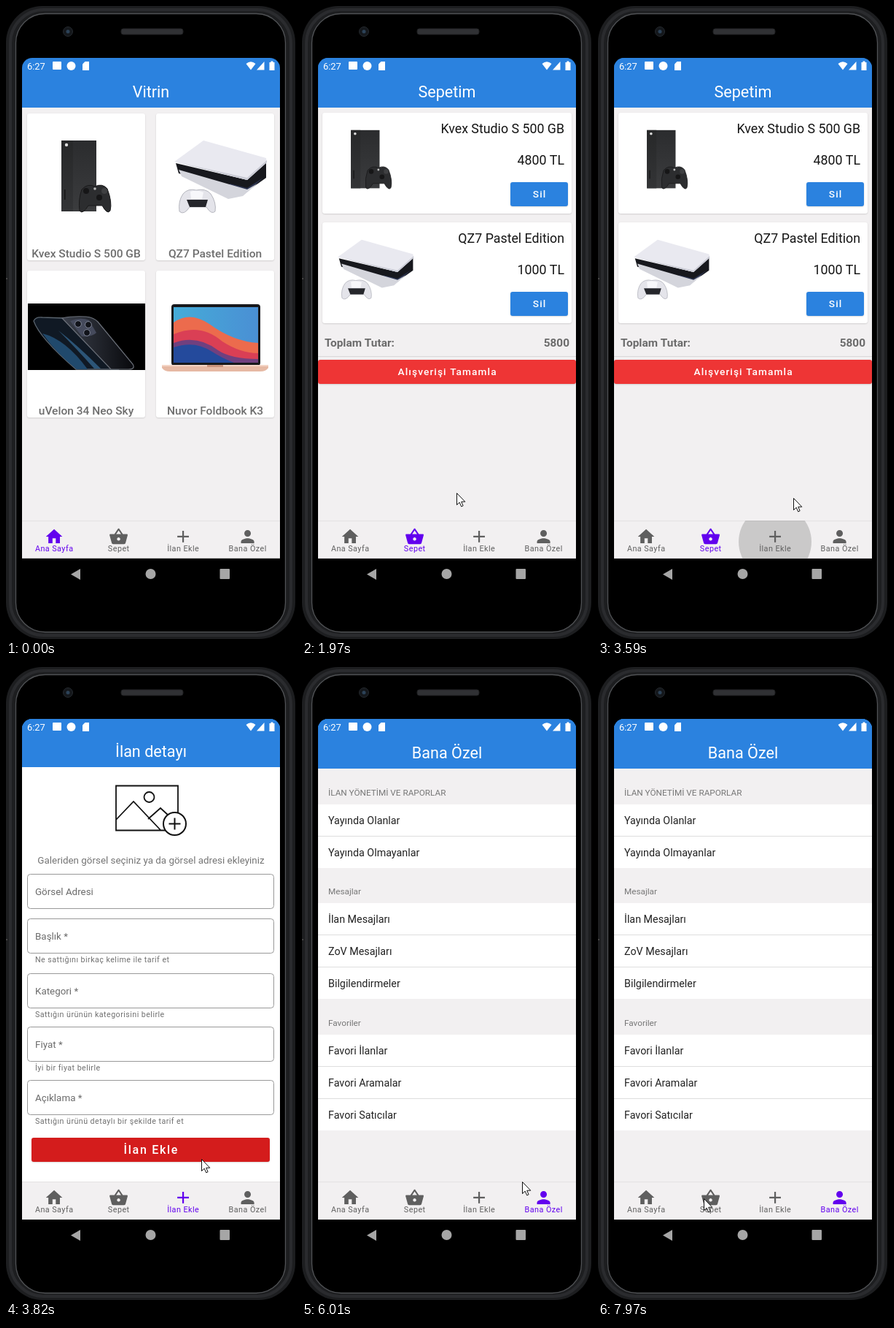
Write an HTML page with a canvas that moves like this. It is 398 px wide and 866 px high and loops after 8000 ms.

```html
<!DOCTYPE html>
<html lang="tr">
<head>
<meta charset="utf-8">
<style>
html, body { margin: 0; width: 100%; height: 100%; overflow: hidden; background: #000; }
canvas { display: block; width: 398px; height: 866px; }
</style>
</head>
<body>
<canvas id="stage" width="398" height="866"></canvas>
<script>
const W = 398, H = 866, LOOP = 8000;
const BLUE = '#2b82df', PAPER = '#f2f0f1', GREY = '#5f5f5f', ACTIVE = '#6200ee';
const stage = document.getElementById('stage').getContext('2d');
let g = stage;

const clamp = v => Math.max(0, Math.min(1, v));
const lerp = (a, b, u) => a + (b - a) * u;

function layer(paint) {
  const c = document.createElement('canvas');
  c.width = W;
  c.height = H;
  g = c.getContext('2d');
  paint();
  g = stage;
  return c;
}
function rect(x, y, w, h, color) {
  g.fillStyle = color;
  g.fillRect(x, y, w, h);
}
function round(x, y, w, h, r, fill, stroke, line = 1) {
  g.beginPath();
  g.roundRect(x, y, w, h, r);
  if (fill) { g.fillStyle = fill; g.fill(); }
  if (stroke) { g.strokeStyle = stroke; g.lineWidth = line; g.stroke(); }
}
function disc(x, y, r, fill, stroke, line = 1) {
  g.beginPath();
  g.arc(x, y, r, 0, 7);
  if (fill) { g.fillStyle = fill; g.fill(); }
  if (stroke) { g.strokeStyle = stroke; g.lineWidth = line; g.stroke(); }
}
function shape(d, fill, stroke, line = 1) {
  const p = new Path2D(d);
  if (fill) { g.fillStyle = fill; g.fill(p); }
  if (stroke) { g.strokeStyle = stroke; g.lineWidth = line; g.stroke(p); }
}
function blend(x0, y0, x1, y1, ...colors) {
  const b = g.createLinearGradient(x0, y0, x1, y1);
  colors.forEach((c, i) => b.addColorStop(i / (colors.length - 1), c));
  return b;
}
function text(s, x, y, size, color, { align = 'left', weight = 400, gap = 0 } = {}) {
  g.font = `${weight} ${size}px Roboto, sans-serif`;
  g.letterSpacing = gap + 'px';
  g.textAlign = align;
  g.fillStyle = color;
  g.fillText(s, x, y);
}
function at(x, y, scale, paint) {
  g.save();
  g.translate(x, y);
  g.scale(scale, scale);
  paint();
  g.restore();
}
function shadowed(paint) {
  g.save();
  g.shadowColor = 'rgba(0,0,0,.17)';
  g.shadowBlur = 2;
  g.shadowOffsetY = .7;
  paint();
  g.restore();
}
const card = (x, y, w, h) => shadowed(() => round(x, y, w, h, 3, '#fff'));
function button(x, y, w, h, color, label, size, gap) {
  shadowed(() => round(x, y, w, h, 3, color));
  text(label, x + w / 2 + gap / 2, y + h / 2 + size * .36, size, '#fff', { align: 'center', weight: 500, gap });
}
function header(title, bottom = 139) {
  rect(22, 71, 354, bottom - 71, BLUE);
  text(title, 199, bottom - 14, 21.6, '#fff', { align: 'center' });
}

// Products, drawn around their own centre
function tower() {
  rect(-34, -49, 48, 97, blend(0, -49, 0, 48, '#2b2c2e', '#3b3c3e'));
  rect(-34, -49, 16, 97, blend(0, -49, 0, 48, '#272829', '#333436'));
  rect(-30, 18, 1.5, 14, '#151515');
  disc(-27, -43, 2.2, '#ddd');
  shape('M-6 18Q2 9 12 14Q22 9 29 17Q36 35 33 47Q29 53 22 40H3Q-5 53 -9 47Q-11 32 -6 18Z', '#2c2d2f', '#19191a');
  disc(0, 20, 4, '#161617');
  disc(18, 29, 4, '#161617');
  disc(25, 20, 4, '#3f4042');
  disc(12, 17, 1.8, '#bbb');
}
function slab() {
  shape('M-54 -18L44 5L70 -19V2L46 19L-50 -4Z', '#17181d');
  shape('M20 10L44 16L66 2L44 21L20 15Z', '#2b3350');
  shape('M-50 -9L44 18L58 10L38 27L18 31L-46 0Z', '#d4d5dc');
  shape('M-56 -20L-16 -49L70 -25L71 -19L44 5Z', '#e9e9f0');
  shape('M-56 -20L44 2L71 -22V-19L44 5Z', '#c9cad4');
  shape('M-44 24Q-37 16 -26 19Q-13 16 -6 24Q2 36 0 48Q-5 53 -12 42H-35Q-43 54 -49 48Q-51 34 -44 24Z', '#e4e4ea', '#b5b6be');
  shape('M-34 21Q-25 18 -16 22L-18 31H-33Z', '#f7f7fa');
  shape('M-39 32H-10L-13 42H-35Z', '#25262b');
}
function phone() {
  rect(-80, -45, 161, 91, '#000');
  shape('M-72 -21Q-70 -27 -60 -26L-30 -25L44 45H-14Q-64 2 -72 -21Z', '#101924', '#59636d', 1.3);
  shape('M-60 -4Q-28 4 2 45H-13Q-42 22 -60 -4Z', '#20496c');
  shape('M-38 -8Q-12 12 20 44H11Q-14 16 -38 -8Z', '#2c5577');
  shape('M-33 -25Q-20 -28 0 -27Q10 -26 16 -20L64 38Q68 45 58 45H34Z', blend(-30, 0, 60, 0, '#3a3f4a', '#0b0c10'), '#6b7079', 1.2);
  shape('M-22 -21Q-8 -27 4 -22L14 -5Q8 1 -6 0Z', '#454a5c');
  for (const [x, y] of [[-11, -17], [3, -16], [1, -5]]) disc(x, y, 4.4, '#11131a', '#7e8494');
}
function laptop() {
  round(-60, -55, 122, 84, 4, '#17181b');
  g.save();
  g.beginPath();
  g.rect(-57, -51, 116, 76);
  g.clip();
  rect(-57, -51, 116, 76, blend(-57, 0, 59, 0, '#45acd8', '#4a8fd4'));
  shape('M-57 -30Q-35 -46 -8 -28Q25 -4 59 -2V25H-57Z', '#ec6b4d');
  shape('M-57 -14Q-20 -30 10 -4Q35 12 59 12V25H-57Z', '#da3f55');
  shape('M-57 -2Q-25 -14 4 8Q22 20 59 20V25H-57Z', '#70407f');
  shape('M-57 4Q-28 -6 -4 10Q10 19 26 25H-57Z', '#244a9c');
  g.restore();
  shape('M-73 28H73V32Q70 37 62 37H-62Q-70 37 -73 32Z', '#e6b9a4');
  rect(-73, 28, 146, 2, '#f4d5c6');
  rect(-11, 28, 22, 3, '#c9937d');
}

const CONSOLE = 'Kvex Studio S 500 GB', SLAB = 'QZ7 Pastel Edition';

function shop() {
  rect(22, 71, 354, 685, PAPER);
  header('Vitrin');
  [[tower, CONSOLE, 86], [slab, SLAB, 86], [phone, 'uVelon 34 Neo Sky', 90], [laptop, 'Nuvor Foldbook K3', 101]]
    .forEach(([draw, name, middle], i) => {
      const x = 29 + i % 2 * 177, y = 147 + (i >> 1) * 215;
      card(x, y, 162, 201);
      at(x + 81, y + middle, 1, draw);
      text(name, x + 81, y + 196.5, 15.5, '#6e6e6e', { align: 'center', weight: 500 });
    });
}
function basket() {
  rect(22, 71, 354, 685, PAPER);
  header('Sepetim');
  [[tower, CONSOLE, 4800], [slab, SLAB, 1000]].forEach(([draw, name, price], i) => {
    const y = 146 + i * 150;
    card(28, y, 342, 138);
    at(95, y + 64, .82, draw);
    text(name, 360, y + 28, 17.8, '#151515', { align: 'right' });
    text(price + ' TL', 360, y + 71, 17.8, '#151515', { align: 'right' });
    button(286, y + 95, 79, 33, BLUE, 'Sil', 13.7, 1.2);
  });
  text('Toplam Tutar:', 31, 465.5, 15.4, '#6b6b6b', { weight: 700 });
  text('5800', 367, 465.5, 15.4, '#6b6b6b', { weight: 700, align: 'right' });
  rect(22, 479, 354, 1, '#d9d7d8');
  button(22, 484, 354, 33, '#ee3535', 'Alışverişi Tamamla', 13.7, 1.1);
}
function advert() {
  rect(22, 71, 354, 685, '#fff');
  header('İlan detayı', 137);
  shape('M151 162.5H236V223.5H151ZM151 209L175 184L212 223M195 208L212 193L224 204', null, '#111', 1.8);
  disc(196.5, 178, 7, null, '#111', 1.8);
  disc(231.5, 214.5, 15.5, '#fff', '#111', 2);
  shape('M223.5 214.5H239.5M231.5 206.5V222.5', null, '#111', 2);
  text('Galeriden görsel seçiniz ya da görsel adresi ekleyiniz', 199, 268.5, 13.4, '#757575', { align: 'center' });
  [
    [283, 'Görsel Adresi', ''],
    [344, 'Başlık *', 'Ne sattığını birkaç kelime ile tarif et'],
    [419, 'Kategori *', 'Sattığın ürünün kategorisini belirle'],
    [492, 'Fiyat *', 'İyi bir fiyat belirle'],
    [565, 'Açıklama *', 'Sattığın ürünü detaylı bir şekilde tarif et']
  ].forEach(([y, label, hint]) => {
    round(29.5, y + .5, 338, 47, 4, null, '#999');
    text(label, 40, y + 28.5, 13.4, '#6c6c6c');
    text(hint, 40, y + 59.5, 10.7, '#707070', { gap: .45 });
  });
  button(35, 644, 327, 33, '#d41c1c', 'İlan Ekle', 16, 1.7);
}
function personal() {
  rect(22, 71, 354, 685, PAPER);
  header('Bana Özel');
  [
    [188, 'İLAN YÖNETİMİ VE RAPORLAR', ['Yayında Olanlar', 'Yayında Olmayanlar']],
    [323, 'Mesajlar', ['İlan Mesajları', 'ZoV Mesajları', 'Bilgilendirmeler']],
    [503, 'Favoriler', ['Favori İlanlar', 'Favori Aramalar', 'Favori Satıcılar']]
  ].forEach(([y, title, rows]) => {
    text(title, 36, y - 12.5, 11.75, '#777');
    rect(22, y, 354, rows.length * 44 - 1, '#fff');
    rows.forEach((row, i) => {
      if (i) rect(22, y + i * 44 - 1, 354, 1, '#dedede');
      text(row, 36, y + 27 + i * 44.2, 14.3, '#222');
    });
  });
}

const TABS = [
  ['Ana Sayfa', 66, 'M10 20v-6h4v6h5v-8h3L12 3 2 12h3v8z'],
  ['Sepet', 154.5, 'M17.21 9l-4.38-6.56c-.19-.28-.51-.42-.83-.42-.32 0-.64.14-.83.43L6.79 9H2c-.55 0-1 .45-1 1 0 .09.01.18.04.27l2.54 9.27c.23.84 1 1.46 1.92 1.46h13c.92 0 1.69-.62 1.93-1.46l2.54-9.27L23 10c0-.55-.45-1-1-1h-4.79zM9 9l3-4.4L15 9H9zm3 8c-1.1 0-2-.9-2-2s.9-2 2-2 2 .9 2 2-.9 2-2 2z'],
  ['İlan Ekle', 243, 'M19 13h-6v6h-2v-6H5v-2h6V5h2v6h6v2z'],
  ['Bana Özel', 331.5, 'M12 12c2.21 0 4-1.79 4-4s-1.79-4-4-4-4 1.79-4 4 1.79 4 4 4zm0 2c-2.67 0-8 1.34-8 4v2h16v-2c0-2.66-5.33-4-8-4z']
];
function tab(i, color) {
  const [label, x, icon] = TABS[i];
  at(x - 13.5, 712.4, 1.13, () => shape(icon, color));
  text(label, x + .2, 746, 10.8, color, { align: 'center', gap: .45 });
}

function shell() {
  rect(0, 0, W, H, '#000');
  round(0, 0, 397, 866, 50, '#1d1e20');
  round(6, 5, 385, 856, 46, null, '#2a2b2e', 4);
  round(13.5, 10.5, 370, 846, 40, '#000', '#505255', 1.3);
  rect(0, 372, 2, 2, '#444');
  disc(85, 35, 6.5, '#14171b', '#25292e');
  disc(85, 35, 2.5, '#2c4258');
  round(158, 31, 85, 8, 3, '#303134', '#1e1f21');
  shape('M102 770V785L89 777.5Z', '#a6a6a6');
  disc(198.5, 777, 7, '#a6a6a6');
  round(293.5, 770, 13.5, 14, 1, '#a6a6a6');
}
function status() {
  text('6:27', 29, 87, 12.9, '#fff');
  round(64, 76, 12, 11, 1, '#fff');
  disc(89.5, 82, 6, '#fff');
  shape('M108.5 76H114V88H105V79.5Z', '#fff');
  shape('M329.5 79Q336 73.5 342.5 79L336 87.5Z', '#fff');
  shape('M354.5 76V87.5H344Z', '#fff');
  shape('M363.5 75.5H366.5V77H368.5V88H361.5V77H363.5Z', '#fff');
}

// time, x, y of the pointer tip
const TRAIL = [
  [30, 325, 852], [190, 174, 759], [340, 174, 759], [610, 150, 738],
  [1290, 150, 738], [1460, 208, 677], [1740, 212, 673], [1969, 212, 673],
  [1970, 212, 666], [2960, 212, 666], [3190, 260, 729], [3370, 260, 729],
  [3590, 268, 673], [5150, 268, 673], [5540, 345, 733], [5600, 345, 733],
  [5690, 331, 713], [5870, 302, 704], [6850, 302, 704], [7080, 207, 686],
  [7200, 160, 673], [7340, 141, 704], [7590, 141, 704], [7780, 90, 713], [7970, 145, 727]
];
function pointer(t) {
  if (t < TRAIL[0][0]) return;
  const n = TRAIL.findIndex(k => k[0] > t);
  const b = TRAIL[n < 0 ? TRAIL.length - 1 : n], a = n < 0 ? b : TRAIL[n - 1];
  const u = b === a ? 0 : (t - a[0]) / (b[0] - a[0]);
  at(Math.round(lerp(a[1], b[1], u)) + .5, Math.round(lerp(a[2], b[2], u)) + .5, 1, () =>
    shape('M0 0V16L3.7 12.6L6.2 18.3L8.6 17.2L6.2 11.7H11.3Z', '#fff', '#111'));
}

// press time, touch x, page fade start
const TAPS = [[1280, 150, 1590], [3350, 260, 3670], [5600, 350, 5850]];
const FADE = 150;

function ripple(t, [start, x, swap], i) {
  const age = t - start, end = swap + FADE - start;
  if (age < 0 || age > end) return;
  const u = clamp(age / 240);
  const fade = clamp(age / 150) * (1 - clamp((age - 280) / (end - 280)));
  disc(lerp(x, TABS[i + 1][1], u), 733, 14 + 36 * (1 - Math.pow(1 - u, 1.3)), `rgba(0,0,0,${.165 * fade})`);
}

const back = layer(shell), bar = layer(status);
const pages = [shop, basket, advert, personal].map(layer);

function draw(t) {
  g.drawImage(back, 0, 0);
  g.save();
  g.beginPath();
  g.roundRect(22, 71, 354, 684.5, [14, 14, 0, 0]);
  g.clip();
  const shown = [1, ...TAPS.map(tap => clamp((t - tap[2]) / FADE))];
  shown.forEach((a, i) => {
    if (!a) return;
    g.globalAlpha = a;
    g.drawImage(pages[i], 0, 0);
  });
  g.globalAlpha = 1;
  g.drawImage(bar, 0, 0);

  g.beginPath();
  g.rect(22, 704, 354, 52);
  g.clip();
  rect(22, 704, 354, 52, PAPER);
  rect(22, 704, 354, 1, '#e4e2e3');
  TAPS.forEach((tap, i) => ripple(t, tap, i));
  TABS.forEach((_, i) => {
    const on = shown[i] * (1 - (shown[i + 1] || 0));
    if (on < 1) tab(i, GREY);
    g.globalAlpha = on;
    if (on) tab(i, ACTIVE);
    g.globalAlpha = 1;
  });
  g.restore();
  pointer(t);
}

function tick() {
  draw(performance.now() % LOOP);
  requestAnimationFrame(tick);
}
tick();
</script>
</body>
</html>
```
